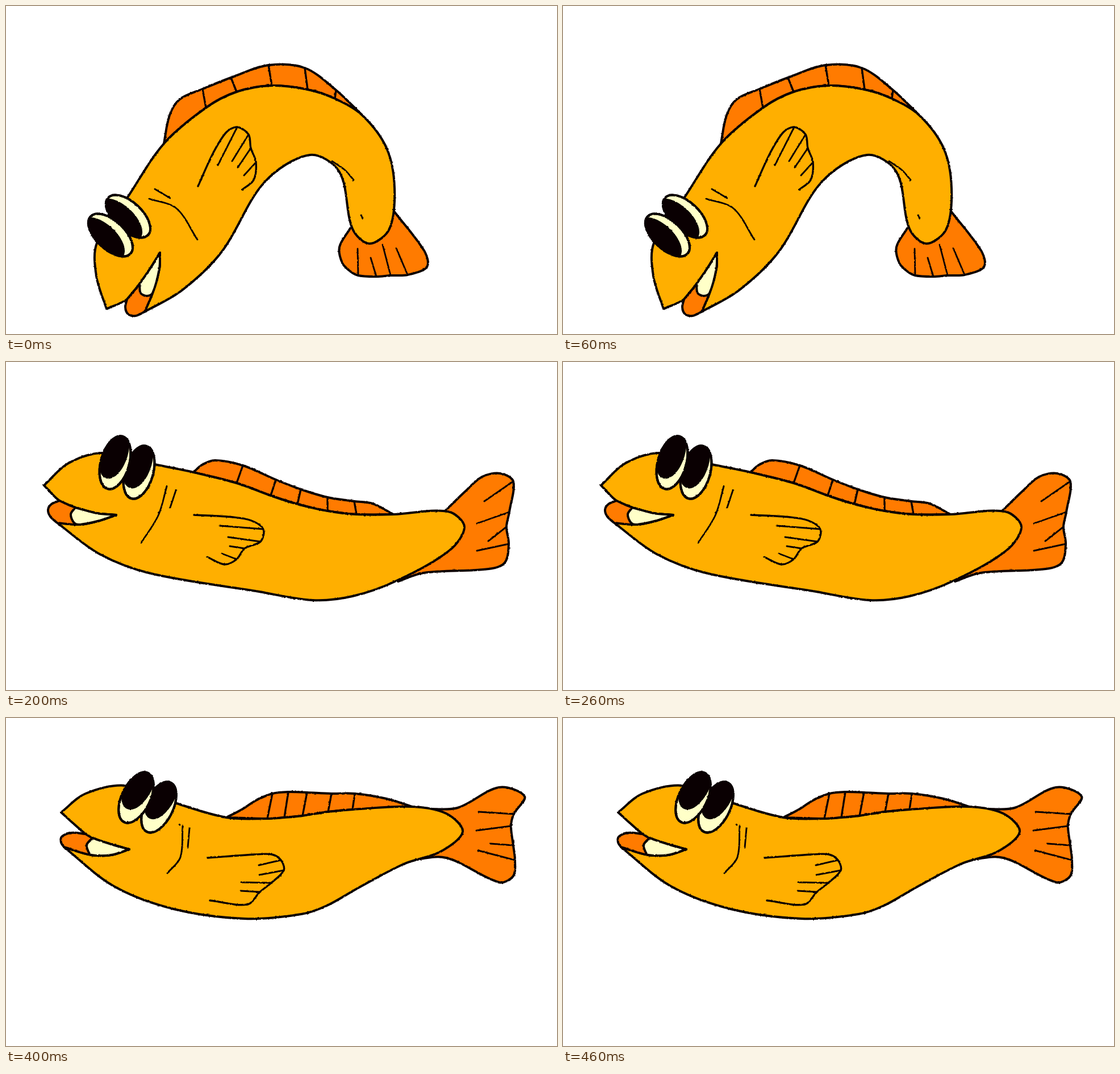
These frames come from a looping animation (970 by 577 pixels, 500 ms). An HTML page:

```html
<!DOCTYPE html>
<html lang="en">
<head>
<meta charset="utf-8">
<title>Swimming fish</title>
<style>
html, body { margin: 0; width: 100%; height: 100%; overflow: hidden; background: #fff; }
svg { display: block; width: 970px; height: 577px; }
path, ellipse { stroke: #0a0002; stroke-width: 4; stroke-linecap: round; stroke-linejoin: round; fill: none; }
.body { fill: #ffaf00; }
.fin { fill: #ff7b00; }
.white { fill: #ffffc8; }
.pupil { fill: #0a0002; stroke: none; }
.thin { stroke-width: 2.9; }
.soft { stroke-width: 3.4; }
</style>
</head>
<body>
<svg viewBox="0 0 970 577">
  <filter id="ink" filterUnits="userSpaceOnUse" x="0" y="0" width="970" height="577" color-interpolation-filters="sRGB">
    <feTurbulence type="fractalNoise" baseFrequency=".3" numOctaves="1" seed="4" result="grain"/>
    <feDisplacementMap in="SourceGraphic" in2="grain" scale="2.6" xChannelSelector="R" yChannelSelector="G"/>
  </filter>
  <clipPath id="lens"><ellipse rx="25" ry="48"/></clipPath>
  <g id="fish" filter="url(#ink)"></g>
</svg>
<script>
const HOLD = 100;
const fish = document.getElementById('fish');
const groups = [];

function add(parent, tag, attrs) {
  const el = document.createElementNS('http://www.w3.org/2000/svg', tag);
  for (const key in attrs) el.setAttribute(key, attrs[key]);
  return parent.appendChild(el);
}

function points(text) {
  const n = text.split(' ').map(Number);
  return Array.from({ length: n.length / 2 }, (_, i) => [n[2 * i], n[2 * i + 1]]);
}

const gap = (a, b) => Math.hypot(a[0] - b[0], a[1] - b[1]);

// Handle at b, a third of the way to c, parallel to a-c
function handle(a, b, c) {
  const k = gap(b, c) / (gap(a, b) + gap(b, c)) / 3;
  return [b[0] + (c[0] - a[0]) * k, b[1] + (c[1] - a[1]) * k];
}

function curve(p) {
  let d = '';
  for (let i = 1; i < p.length; i++) {
    const b = p[i - 1], c = p[i];
    const h = [handle(p[i - 2] || b, b, c), handle(p[i + 1] || c, c, b), c];
    d += 'C' + h.flat().map(v => v.toFixed(1)).join(' ');
  }
  return d;
}

// Smooth runs that meet in corners
function line(...runs) {
  let end, d = 'M' + runs[0][0].join(' ');
  for (const run of runs) {
    const p = end ? [end, ...run] : run;
    d += curve(p);
    end = p[p.length - 1];
  }
  return d;
}

const shape = (...runs) => line(...runs) + 'Z';

// Straight lines from part of an outline to a row of inner points
const rays = (outer, inner) => inner.map((p, i) => line([outer[i], p])).join('');

function drawEyes(g, text) {
  const [rx, ry, fx, fy, tilt, dx, dy] = text.split(' ').map(Number);
  for (const [x, y] of [[rx, ry], [fx, fy]]) {
    const eye = add(g, 'g', { transform: `translate(${x} ${y}) rotate(${tilt})` });
    const oval = (parent, style, more) => add(parent, 'ellipse', { class: style, rx: 25, ry: 48, ...more });
    oval(eye, 'white');
    const inside = add(eye, 'g', { 'clip-path': 'url(#lens)' });
    oval(inside, 'pupil', { transform: `translate(${dx} ${dy})` });
    oval(eye, '');
  }
}

function addPose(trunk, face) {
  const g = add(fish, 'g', { visibility: 'hidden' });
  const draw = (style, d) => add(g, 'path', { class: style, d });
  const [head, back, belly, crest, tail, tailRays] =
    ['head', 'back', 'belly', 'crest', 'tail', 'tailRays'].map(k => points(trunk[k]));
  const [upper, lower, tongue, tooth, fin, finRays] =
    ['upper', 'lower', 'tongue', 'tooth', 'fin', 'finRays'].map(k => points(face[k]));
  const corner = upper[0];
  const jaw = belly[belly.length - 1];

  draw('fin', line(tail));
  draw('thin', rays(tail.slice(4), tailRays));

  // The crest stands on the back; its rays end in the knots of the back
  draw('fin', shape([back[0], ...crest, back[6]], back.slice(0, 6).reverse()));
  draw('soft', rays(crest.slice(2), back.slice(1, 6)));

  const lip = [...lower, corner];
  draw('body', shape([...head, ...back, ...belly], lip, upper.slice(1)));
  draw('fin', shape(upper.slice(0, 4), [...tongue, jaw], lip));
  draw('white', shape(upper.slice(0, 3), [...tooth, ...lip]));
  drawEyes(g, face.eyes);

  draw('soft', line(fin));
  draw('thin', rays(fin.slice(3), finRays));
  for (const mark of face.marks.split('/')) draw('thin', line(points(mark)));
  groups.push(g);
}

addPose({
  head: '177 533 159 475 160 417 213 338',
  back: '278 242 352 179 406 151 468 140 531 147 579 163 627 192',
  belly: '670 250 684 320 675 392 640 418 610 392 587 292 535 262 455 310 380 432 310 500 244 538',
  crest: '288 192 306 164 346 146 396 126 462 104 526 109 581 148',
  tail: '606 391 587 424 592 452 605 466 620 474 652 476 677 474 707 473 741 459 737 432 683 361',
  tailRays: '619 427 642 443 663 420 687 426'
}, {
  eyes: '215 370 184 403 -47 -14 -6',
  upper: '271 434 255 460 235 489 213 516 177 533',
  lower: '258 505 270 462',
  tongue: '210 530 215 542 228 545',
  tooth: '237 505 248 510',
  fin: '338 317 365 258 388 222 407 213 427 226 431 250 440 275 436 306 416 323',
  finRays: '373 280 398 273 408 284 419 298',
  marks: '252 339 300 356 337 411/262 322 289 338/574 273 596 288 612 306/625 368 628 374'
});

addPose({
  head: '116 409 118 350 145 294 218 236',
  back: '263 206 334 156 381 137 438 129 501 134 549 148 624 188',
  belly: '690 254 725 306 733 355 700 384 662 353 592 305 515 284 445 306 365 364 275 411 182 437',
  crest: '277 172 300 144 328 130 374 114 433 93 507 101 557 128',
  tail: '662 355 668 405 680 440 702 464 733 469 756 450 781 411 818 395 828 374 800 338 716 303',
  tailRays: '701 407 726 411 752 370 781 372'
}, {
  eyes: '207 270 168 290 -27 -12 -11',
  upper: '239 349 215 370 185 389 155 406 116 409',
  lower: '205 412 230 372',
  tongue: '150 420 152 434 163 440',
  tooth: '183 402 192 411',
  fin: '337 252 388 203 412 185 436 177 452 195 445 225 447 249 436 272 407 283',
  finRays: '382 230 411 231 414 243 420 260',
  marks: '253 251 288 282 309 348/268 239 289 264/671 319 675 323'
});

addPose({
  head: '67 217 110 178 172 160 262 180',
  back: '330 194 406 213 466 235 513 250 566 262 617 268 682 268',
  belly: '778 263 807 290 780 332 685 386 610 412 540 419 440 403 255 372 165 338 90 283',
  crest: '345 181 368 173 417 182 475 207 519 224 566 238 613 245 645 249',
  tail: '773 262 808 228 838 202 870 196 893 210 886 264 881 290 885 320 878 353 850 364 735 371 690 386',
  tailRays: '842 245 829 284 849 315 829 332'
}, {
  eyes: '234 194 192 177 16 -7 -17',
  upper: '194 269 160 266 122 256 94 244 67 217',
  lower: '130 286 165 279',
  tongue: '80 250 74 260 78 272',
  tooth: '114 268 120 283',
  fin: '331 269 400 273 432 279 453 294 448 316 420 328 406 347 385 356 354 343',
  finRays: '376 288 391 308 394 324 380 337',
  marks: '283 219 268 270 238 318/299 226 289 256'
});

addPose({
  head: '129 137 170 119 250 118 333 162',
  back: '378 194 425 223 469 242 512 251 560 250 605 244 674 215',
  belly: '735 176 780 178 785 212 690 298 600 358 520 388 445 397 340 370 235 313 155 242 130 215',
  crest: '400 190 443 175 462 183 496 202 532 213 571 216 615 213 658 207',
  tail: '728 178 764 137 790 80 830 65 838 101 846 124 870 141 889 160 902 195 885 212 800 236 745 256',
  tailRays: '785 137 802 166 837 169 827 190'
}, {
  eyes: '299 164 262 141 35 -6 -23',
  upper: '237 225 210 216 176 195 157 181 129 137',
  lower: '180 230 205 232',
  tongue: '140 179 124 183 120 194',
  tooth: '163 203 170 219',
  fin: '364 280 435 294 458 302 472 323 464 344 440 348 428 358 408 373 367 353',
  finRays: '402 306 411 322 403 335 398 348',
  marks: '328 201 319 265 282 293/342 214 335 248'
});

addPose({
  head: '97 166 140 133 212 119 300 150',
  back: '388 175 460 177 490 175 522 172 567 165 610 161 715 156',
  belly: '775 168 804 200 765 235 700 257 620 299 565 330 520 345 420 353 295 336 190 296 102 227',
  crest: '415 161 440 145 469 133 497 130 530 131 573 133 614 133 670 142',
  tail: '740 160 795 158 868 122 913 138 894 169 889 190 893 224 896 250 893 278 868 289 775 246 712 250',
  tailRays: '832 165 828 198 853 221 831 233'
}, {
  eyes: '269 157 229 140 26 -6 -23',
  upper: '217 231 185 222 152 211 140 204 97 166',
  lower: '150 241 185 241',
  tongue: '115 202 98 209 97 219',
  tooth: '142 223 145 235',
  fin: '355 246 440 240 468 240 484 250 489 268 467 290 447 306 425 328 359 321',
  finRays: '445 259 446 276 414 289 413 304',
  marks: '311 190 307 245 284 273/323 194 320 228/305 187 306 188'
});

let shown = -1;
function tick() {
  const now = Math.floor(performance.now() / HOLD) % groups.length;
  if (now !== shown) {
    groups.forEach((g, i) => g.setAttribute('visibility', i === now ? 'visible' : 'hidden'));
    shown = now;
  }
  requestAnimationFrame(tick);
}
tick();
</script>
</body>
</html>
```
